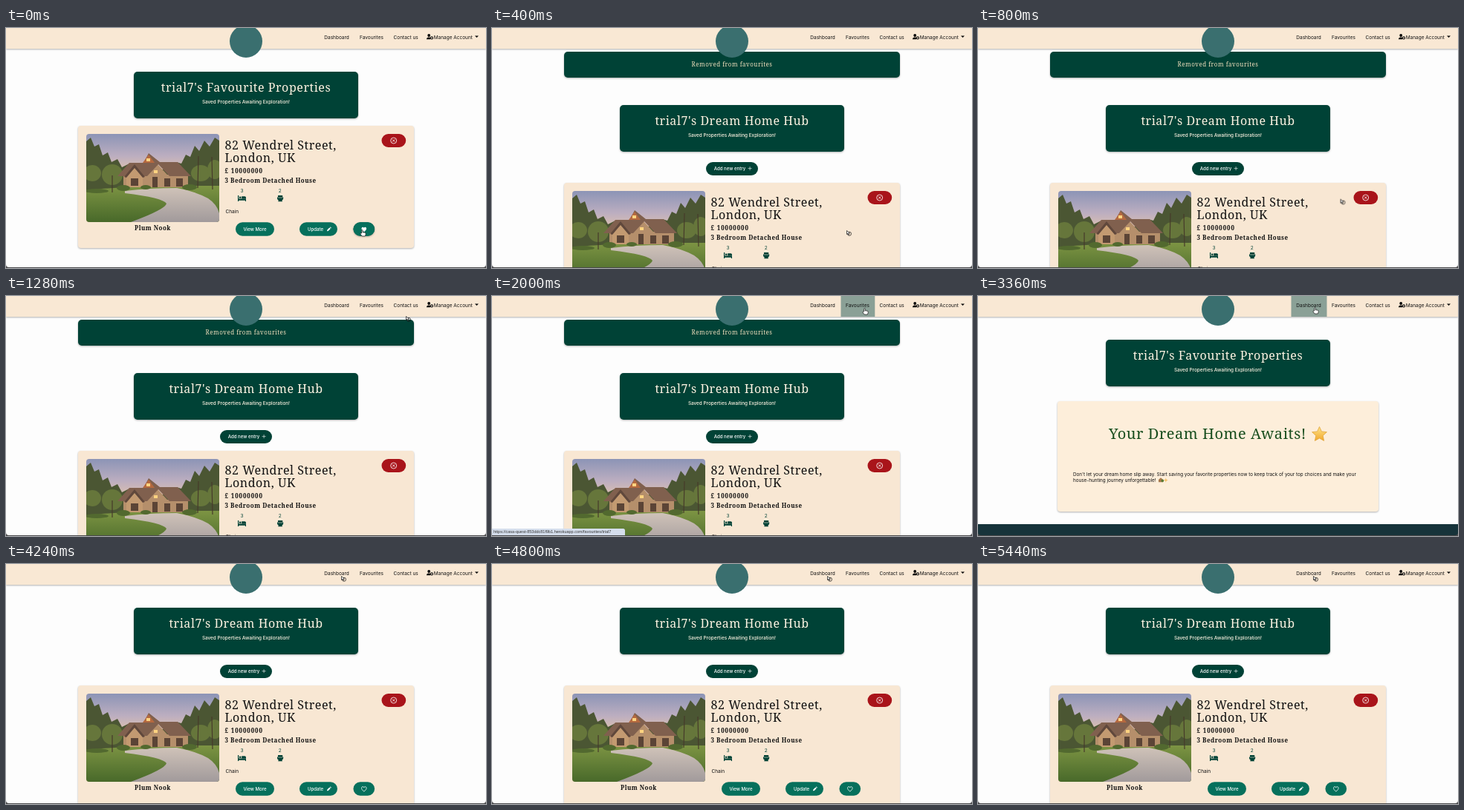
Animation of 646x324 px, one loop 5.52 s. Source, as an HTML page:

```html
<!DOCTYPE html>
<html lang="en">
<head>
<meta charset="utf-8">
<title>Property favourites</title>
<style>
html, body { margin: 0; width: 100%; height: 100%; overflow: hidden; background: #fdfdfd; }
svg.stage { display: block; width: 646px; height: 324px; }
text { font: 6.5px Inter, "Open Sans", sans-serif; fill: #111; }
.serif { font-family: "Noto Serif", serif; }
.mid { text-anchor: middle; }
.light { fill: #fdf3e2; }
.h1 { font-size: 16px; letter-spacing: .55px; font-weight: 500; }
.h2 { font-size: 16px; letter-spacing: .55px; font-weight: 500; }
.h3 { font-size: 8px; letter-spacing: .5px; font-weight: 600; }
.sub { font-size: 6.4px; font-weight: 500; }
.btn { font-size: 6.1px; font-weight: 500; fill: #fff; }
.url { font: 5.5px "Liberation Sans", Arial, sans-serif; fill: #333; }
.green { fill: #004236; }
.pill { fill: #06705c; }
.shade { filter: drop-shadow(0 1px 1px rgba(0, 0, 0, .3)); }
.line { fill: none; stroke: #fff; stroke-width: .8; }

/* One 5520 ms loop; visibility and page shifts are hard cuts. */
.cut { animation: 5520ms step-end infinite; }
#saved { animation-name: saved; }
#hub { animation-name: hub; }
#shift { animation-name: shift; }
#alert { animation-name: alert; }
#empty { animation-name: empty; }
#hoverFav { animation-name: hoverFav; }
#hoverDash { animation-name: hoverDash; }
#urlFav { animation-name: urlFav; }
#urlDash { animation-name: urlDash; }
#hand { animation-name: hand; }
#arrow { animation-name: arrow; }
#cursor { animation: travel 5520ms linear infinite; }

@keyframes saved { 0% { visibility: visible } 4.35%, 100% { visibility: hidden } }
@keyframes hub {
  0%, 39.13% { visibility: hidden }
  4.35%, 73.91%, 100% { visibility: visible }
}
@keyframes shift { 0% { transform: translateY(45px) } 39.13%, 100% { transform: none } }
@keyframes alert { 0%, 39.13%, 100% { visibility: hidden } 4.35% { visibility: visible } }
@keyframes empty { 0%, 73.91%, 100% { visibility: hidden } 39.13% { visibility: visible } }
@keyframes hoverFav {
  0%, 39.13%, 55.07%, 100% { visibility: hidden }
  26.09%, 47.83% { visibility: visible }
}
@keyframes hoverDash { 0%, 73.91%, 100% { visibility: hidden } 55.07% { visibility: visible } }
@keyframes urlFav { 0%, 43.48%, 100% { visibility: hidden } 33.33% { visibility: visible } }
@keyframes urlDash { 0%, 73.91%, 100% { visibility: hidden } 65.22% { visibility: visible } }
@keyframes hand {
  0%, 26.09%, 47.83% { visibility: visible }
  4.35%, 39.13%, 73.91%, 100% { visibility: hidden }
}
@keyframes arrow {
  0%, 26.09%, 47.83% { visibility: hidden }
  4.35%, 39.13%, 73.91%, 100% { visibility: visible }
}
@keyframes travel {
  0%, 11.59% { transform: translate(480px, 273px); animation-timing-function: ease-in-out }
  21.74%, 23.19% { transform: translate(541px, 27px); animation-timing-function: ease-in-out }
  28.99%, 52.17% { transform: translate(502px, 17px); animation-timing-function: ease-in-out }
  57.97%, 100% { transform: translate(454px, 16px) }
}
</style>
</head>
<body>
<svg class="stage" viewBox="0 0 646 324" xmlns="http://www.w3.org/2000/svg">
  <defs>
    <linearGradient id="sky" x2="0" y2="1">
      <stop offset="0" stop-color="#8c94b6"/>
      <stop offset=".25" stop-color="#bcaec0"/>
      <stop offset=".5" stop-color="#edc9a8"/>
    </linearGradient>
    <linearGradient id="lawn" x2="0" y2="1">
      <stop offset="0" stop-color="#7d9443"/>
      <stop offset="1" stop-color="#48692a"/>
    </linearGradient>
    <linearGradient id="drive" x2="0" y2="1">
      <stop offset="0" stop-color="#cfc2b8"/>
      <stop offset="1" stop-color="#a19a9b"/>
    </linearGradient>
    <linearGradient id="gold" x2="0" y2="1">
      <stop offset="0" stop-color="#ffe58a"/>
      <stop offset="1" stop-color="#f1a72c"/>
    </linearGradient>
    <clipPath id="round"><rect width="179" height="119" rx="4"/></clipPath>
    <path id="heart" d="M0 3.2C-5-.2-3.2-3.2-1.6-3.2Q-.4-3.2 0-2Q.4-3.2 1.6-3.2C3.2-3.2 5-.2 0 3.2z"/>

    <g id="photo" clip-path="url(#round)">
      <rect width="179" height="119" fill="url(#sky)"/>
      <path d="M0 10L6 5L11 17L17 14L22 29L29 25L34 38L42 34L48 45L58 40L66 48H116L121 38L128 40L134 28L140 31L146 16L152 23L159 9L166 17L173 5L179 9V80H0z" fill="#4b5633"/>
      <g fill="#66763b">
        <ellipse cx="35" cy="55" rx="14" ry="14"/>
        <ellipse cx="8" cy="53" rx="12" ry="11"/>
        <ellipse cx="154" cy="53" rx="13" ry="11"/>
        <ellipse cx="173" cy="48" rx="10" ry="13"/>
      </g>
      <path d="M0 76Q60 69 179 70V119H0z" fill="url(#lawn)"/>
      <path d="M52 77Q85 73 122 73Q148 78 164 87Q176 95 179 107V119H60Q106 102 108 94Q103 86 52 80z" fill="url(#drive)"/>
      <g transform="translate(-3 -2)">
        <path d="M53 57H84L99 43L112 57H140V74H53z" fill="#b58f6b"/>
        <path d="M45 59L61 41L80 41L87 28L102 40H126L144 59H115L100 43L85 59z" fill="#80604e"/>
        <path d="M57 59L68 46L79 59V74H57z" fill="#c39a71"/>
        <path d="M54 60L68 43L82 60L79 61L68 48L57 61z" fill="#60483c"/>
        <path d="M79 41L87 30L95 41z" fill="#b5693f"/>
        <path d="M63 62H73V72H63zM92 60H99V74H92zM108 62H116V73H108zM124 62H133V73H124z" fill="#5b4436"/>
        <path d="M84 35H89V39H84zM94 51H99V55H94z" fill="#ffd380"/>
      </g>
      <g fill="#52692f">
        <ellipse cx="50" cy="73" rx="9" ry="4"/>
        <ellipse cx="80" cy="72" rx="7" ry="3"/>
        <ellipse cx="139" cy="72" rx="10" ry="4"/>
        <ellipse cx="14" cy="77" rx="16" ry="3"/>
      </g>
      <path d="M35 56V79M151 30L150 73M169 31L170 75" stroke="#463a2a" stroke-width="1.2"/>
    </g>

    <g id="hero">
      <rect class="green shade" x="172" y="59" width="302" height="63" rx="5"/>
      <text class="sub mid light" x="323" y="102">Saved Properties Awaiting Exploration!</text>
    </g>

    <g id="card">
      <rect class="shade" x="97" y="132" width="452" height="165" rx="4" fill="#f8e7d3"/>
      <use href="#photo" x="108" y="143"/>
      <text class="serif h3 mid" x="197.5" y="273">Plum Nook</text>
      <text class="serif h2" x="294.5" y="164">82 Wendrel Street,</text>
      <text class="serif h2" x="294.5" y="181">London, UK</text>
      <text class="serif h3" x="294.5" y="196" style="letter-spacing:.9px">£ 10000000</text>
      <text class="serif h3" x="294.5" y="209">3 Bedroom Detached House</text>
      <text class="mid green" x="317.5" y="221.5">3</text>
      <text class="mid green" x="368.8" y="221.5">2</text>
      <path class="green" d="M312 226h1.2v4.6h9.8v3.4h-1.1v-1.2h-8.7v1.2H312zM317.2 227.2h4q1.8 0 1.8 1.8v1.2h-5.8z"/>
      <circle class="green" cx="315.2" cy="228.8" r="1.3"/>
      <path class="green" d="M366 226h6.2v2.4h1v1.6q0 1.7-1.7 2.5l.4 1.8h-5.6l.4-1.8q-1.7-.8-1.7-2.5v-1.6h1z"/>
      <path d="M366 229h6.2" stroke="#f8e7d3" stroke-width=".6"/>
      <text x="295.5" y="250.3">Chain</text>
      <rect x="505.5" y="143" width="32.7" height="18" rx="9" fill="#a9141a"/>
      <circle class="line" cx="521.7" cy="152" r="4"/>
      <path class="line" d="M520 150.3l3.4 3.4m0-3.4l-3.4 3.4"/>
      <g class="pill">
        <rect x="309" y="262.3" width="52" height="18.4" rx="9.2"/>
        <rect x="395" y="262.3" width="51" height="18.4" rx="9.2"/>
        <rect x="467.5" y="262.3" width="28.6" height="18.4" rx="9.2"/>
      </g>
      <text class="btn mid" x="335" y="273.5">View More</text>
      <text class="btn" x="406" y="273.5">Update</text>
      <path d="M432 274.3l.4-1.7l3-3l1.3 1.3l-3 3zM435.9 269.1l.7-.7l1.3 1.3l-.7.7z" fill="#fff"/>
    </g>
  </defs>

  <rect width="646" height="324" fill="#fdfdfd"/>

  <g id="saved" class="cut">
    <use href="#hero"/>
    <text class="serif h1 mid light" x="323" y="86">trial7's Favourite Properties</text>
    <use href="#card"/>
    <rect class="pill shade" x="467.5" y="262.3" width="28.6" height="18.4" rx="9.2"/>
    <use href="#heart" x="481.8" y="272" fill="#fff"/>
  </g>

  <g id="hub" class="cut">
    <g id="shift" class="cut">
      <use href="#hero"/>
      <text class="serif h1 mid light" x="323" y="86">trial7's Dream Home Hub</text>
      <rect class="green" x="288" y="136" width="70" height="18" rx="9"/>
      <text class="btn" x="298.7" y="146.5">Add new entry</text>
      <path class="line" d="M344.6 144.6h5m-2.5-2.5v5" style="stroke-width:.6"/>
      <g transform="translate(0 32)">
        <use href="#card"/>
        <use href="#heart" class="line" x="481.8" y="271.8"/>
      </g>
    </g>
  </g>

  <g id="alert" class="cut">
    <rect class="green shade" x="97" y="32" width="452" height="35" rx="5"/>
    <text class="serif h3 mid" x="323" y="51.8" style="fill:#f3dfbd;font-weight:500">Removed from favourites</text>
  </g>

  <g id="empty" class="cut">
    <use href="#hero"/>
    <text class="serif h1 mid light" x="323" y="86">trial7's Favourite Properties</text>
    <rect class="shade" x="107" y="142" width="432" height="149" rx="4" fill="#fdeeda"/>
    <text class="serif h2" x="176" y="193" style="font-size:20px;fill:#174d1d">Your Dream Home Awaits!</text>
    <path d="M459.5 176.5l2.9 6.4l7 .8l-5.2 4.8l1.4 6.9l-6.1-3.4l-6.1 3.4l1.4-6.9l-5.2-4.8l7-.8z"
      fill="url(#gold)" stroke="#e0a53a" stroke-width=".8" stroke-linejoin="round"/>
    <text style="font-size:6.34px"><tspan x="128" y="243.3">Don't let your dream home slip away. Start saving your favorite properties now to keep track of your top choices and make your</tspan><tspan x="128" y="251.3">house-hunting journey unforgettable!</tspan></text>
    <path d="M243 248l3-2.8l3 2.8v3.3h-6z" fill="#a8794b"/>
    <circle cx="248.3" cy="249.4" r="1.8" fill="#587a35"/>
    <path d="M252.8 245.5l.8 2.3l2.2.8l-2.2.8l-.8 2.3l-.8-2.3l-2.2-.8l2.2-.8z" fill="#f4c36b"/>
    <rect y="308" width="646" height="16" fill="#16333a"/>
  </g>

  <g id="nav">
    <rect class="shade" width="646" height="28" fill="#f9e8d4"/>
    <rect id="hoverDash" class="cut" x="421.5" width="48" height="28" fill="#8aa096"/>
    <rect id="hoverFav" class="cut" x="469.5" width="45.8" height="28" fill="#8aa096"/>
    <text x="428.3" y="15.2">Dashboard</text>
    <text x="476" y="15.2">Favourites</text>
    <text x="521.5" y="15.2">Contact us</text>
    <text x="575.7" y="15.2">Manage Account</text>
    <path d="M631 10.5h5l-2.5 2.6z"/>
    <circle cx="569.2" cy="10" r="1.9"/>
    <path d="M566 15.2q0-2.8 3.2-2.8q1.4 0 2 .5v2.3z"/>
    <circle cx="573" cy="13.4" r="1.5" fill="none" stroke="#111" stroke-width="1.1"/>
    <circle cx="323" cy="18" r="22" fill="#3a6f6f"/>
  </g>

  <path d="M0 319Q0 323 4 323H642Q646 323 646 319V324H0z" fill="#4a4a4c"/>

  <g id="urlFav" class="cut">
    <path d="M0 314H176.5Q179 314 179 316.5V323H0z" fill="#d5deec"/>
    <text class="url" x="2" y="320.3">https://casa-quest-853ddc81f9b1.herokuapp.com/favourites/trial7</text>
  </g>
  <g id="urlDash" class="cut">
    <path d="M0 314H176.5Q179 314 179 316.5V323H0z" fill="#d5deec"/>
    <text class="url" x="2" y="320.3">https://casa-quest-853ddc81f9b1.herokuapp.com/dashboard/trial7</text>
  </g>

  <g id="cursor" stroke="#111" stroke-width=".7" stroke-linejoin="round" fill="#fff">
    <path id="hand" class="cut" d="M-1.3 4V.6q0-.9.8-.9t.8.9V3q.8-.5 1.4.1q.8-.4 1.3.2q1.1-.1 1.1 1V5.5Q4 7 3.2 8H-.8Q-2 6.8-3 5.1q-.3-.9.5-1z"/>
    <g id="arrow" class="cut">
      <circle cx="1" cy="4.8" r="2.5" fill="none"/>
      <path d="M-2.5.5V5.5l1.3-1.1l.9 1.9l.9-.4L-.2 4H1.4z"/>
    </g>
  </g>
</svg>
</body>
</html>
```
